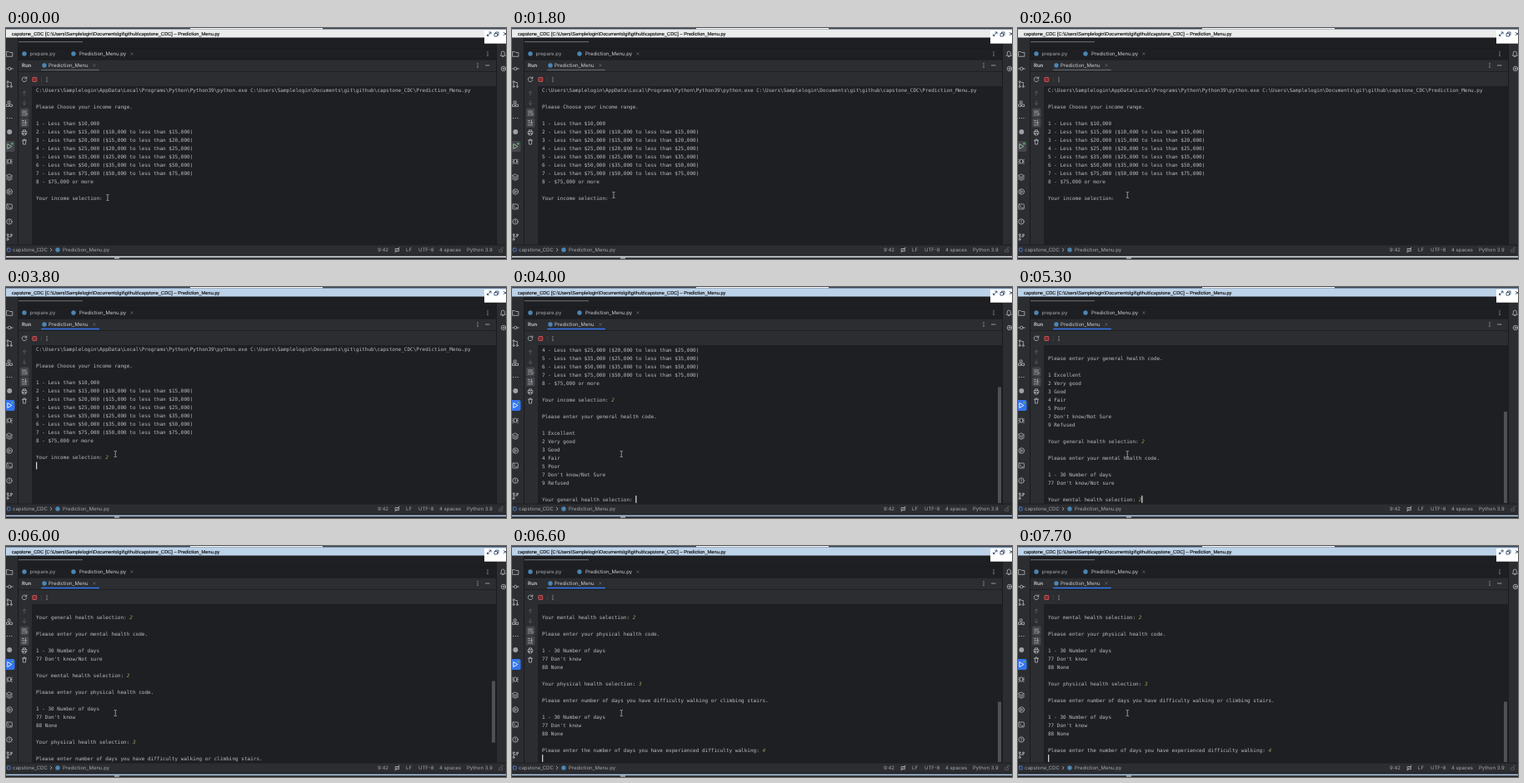
An HTML page for the animation above (8 s loop, 600 px wide and 278 px high).

```html
<!DOCTYPE html>
<html lang="en">
<head>
<meta charset="utf-8">
<title>Prediction menu</title>
<style>
  html, body { margin: 0; width: 100%; height: 100%; overflow: hidden; background: #1e1f22; }
  svg { display: block; width: 600px; height: 278px; text-rendering: geometricPrecision; }
  text { white-space: pre; }
  .ui { font: 6px Inter, sans-serif; fill: #ced0d6; }
  .dim { fill: #a4a7ae; }
  .strong { font-weight: 600; }
  .title { font: 5.68px "Liberation Sans", Arial, sans-serif; fill: #111; stroke: #111; stroke-width: .15; }
  .mono { font: 6.02px "DejaVu Sans Mono", monospace; fill: #bcbec4; }
  .answer { font-style: italic; fill: #98a35c; }
  .icon { fill: none; stroke: #b4b7bd; stroke-width: .8; stroke-linejoin: round; stroke-linecap: round; }
  .faint { stroke: #5d6066; }
  .dots { fill: #ced0d6; }
</style>
</head>
<body>
<svg viewBox="0 0 600 278">
  <defs>
    <clipPath id="view"><rect x="31" y="70" width="557" height="191"/></clipPath>
    <g id="kebab" class="dots"><circle cy="-2.2" r=".6"/><circle r=".6"/><circle cy="2.2" r=".6"/></g>
    <path id="cross" class="icon faint" d="M-1.3-1.3l2.6 2.6m0-2.6l-2.6 2.6"/>
    <circle id="badge" r="2.7" fill="#4b86b4"/>
  </defs>

  <!-- Panels -->
  <rect width="600" height="278" fill="#2b2d30"/>
  <rect x="15" y="11" width="573" height="27" fill="#1e1f22"/>
  <rect x="15" y="16" width="77" height="1.200" fill="#606368"/>
  <path d="M14.500 12v249M588.500 12v249M15 24.500h573M15 38h573" stroke="#1a1b1d"/>
  <rect x="31" y="70" width="557" height="191" fill="#1e1f22"/>
  <path d="M15 52.500h573M0 261h600" stroke="#1e1f22"/>
  <rect id="tabLine" x="42" y="49.800" width="70" height="1.500" rx=".7"/>
  <rect y="273.500" width="600" height="1" fill="#15171a"/>
  <rect id="bottomEdge" y="274.500" width="600" height="2"/>
  <rect y="276.500" width="600" height="1.500" fill="#25282c"/>
  <rect x="130" y="276.500" width="6" height="1" fill="#eceff2"/>

  <!-- Title bar -->
  <rect width="600" height="2" fill="#3c4656"/>
  <rect x="221" width="159" height="1.400" fill="#f2f4f6"/>
  <rect id="titleBar" y="1.500" width="600" height="10"/>
  <text class="title" x="7" y="9">capstone_CDC [C:\Users\Samplelogin\Documents\git\github\capstone_CDC] – Prediction_Menu.py</text>
  <rect x="574" y="3" width="26" height="15.700" fill="#fff"/>
  <path d="M577.500 9.500l4.500-4.500m-2.500 0h2.500v2.500M577.500 7.500v2h2M586 6.500h3.500v3.500h-3.500zM587.500 6.500v-1.500h3.500v3.500h-1.500M597 5l4 4m0-4l-4 4" fill="none" stroke="#35506f" stroke-width=".9"/>

  <!-- Tabs and run header -->
  <use href="#badge" x="22" y="31"/>
  <text class="ui dim" x="28.500" y="33.200">prepare.py</text>
  <use href="#badge" x="81" y="31"/>
  <text class="ui" x="88" y="33.200">Prediction_Menu.py</text>
  <use href="#cross" x="151" y="31"/>
  <use href="#kebab" x="578" y="31"/>
  <text class="ui strong" x="19" y="47">Run</text>
  <use href="#badge" x="46" y="45"/>
  <text class="ui" x="51" y="47">Prediction_Menu</text>
  <use href="#cross" x="106" y="45"/>
  <use href="#kebab" x="566" y="45"/>
  <path class="icon" d="M575.500 45h4.500"/>

  <!-- Run toolbar -->
  <path class="icon" d="M24.500 60.500a2.800 2.800 0 1 0 .3 2M24.800 58.800v2h-2"/>
  <rect x="31.800" y="59.500" width="5" height="5" rx=".6" fill="#7a2f33" stroke="#db5c5c" stroke-width=".8"/>
  <path d="M42.500 59v6" stroke="#43454a" stroke-width=".7"/>
  <use href="#kebab" x="49" y="62"/>
  <path class="icon faint" d="M22 81v-5m-2 2l2-2l2 2M22 87.500v5m-2-2l2 2l2-2"/>
  <rect x="17" y="96.500" width="10.500" height="11" rx="1.500" fill="#43454a"/>
  <rect x="17" y="108.500" width="10.500" height="11" rx="1.500" fill="#43454a"/>
  <path class="icon" d="M19.500 100h5M19.500 102.200h4.500a1.300 1.300 0 0 1 0 2.600h-1.500M19.500 104.800h1.500"/>
  <path class="icon" d="M19.500 111.500h2M19.500 114h2M19.500 116.800h5M23.500 111v4m-1.300-1.300l1.300 1.300l1.300-1.300"/>
  <path class="icon" d="M20.500 124.500v-1.700h3v1.700M20.500 127.500h-1.300v-3h5.600v3h-1.300M20.500 126.500h3v2.300h-3z"/>
  <path class="icon" d="M19.500 135.200h5M21 135v-1h2v1M20.200 135.300l.3 4.700h3l.3-4.700"/>

  <!-- Left strip -->
  <g class="icon">
    <path d="M1 28.500h2.300l1 1h3.500v4.800h-6.800z"/>
    <path d="M0 49h2.300M6 49h2.300"/><circle cx="4.200" cy="49" r="1.800"/>
    <path d="M2 66v3.500M6.300 69.500v-4h-2"/><circle cx="2" cy="64.700" r="1"/><circle cx="6.300" cy="70.500" r="1"/><circle cx="2" cy="70.500" r="1"/>
    <path d="M2.500 88h2.500v2.500h-2.500zM1 92h2.500v2.500h-2.500zM5 92h2.500v2.500h-2.500z"/>
    <ellipse cx="4" cy="160.500" rx="2" ry="2.700"/><path d="M.7 158.500l1.500.7M.4 161h1.600M.8 163.500l1.500-.8M7.300 158.500l-1.500.7M7.600 161h-1.600M7.200 163.500l-1.500-.8"/>
    <path d="M4 176l3.500 1.800l-3.500 1.800l-3.500-1.800zM.6 179.700l3.400 1.800l3.400-1.800M.6 181.600l3.400 1.800l3.400-1.800"/>
    <circle cx="4.200" cy="197" r="3.300"/><path d="M3.300 195.500l2.400 1.500l-2.400 1.500z"/>
    <rect x=".8" y="212" width="6.500" height="6" rx=".8"/><path d="M2.200 213.800l1.300 1.200l-1.300 1.200M4.500 216.500h1.500"/>
    <circle cx="4" cy="233" r="3.200"/><path d="M4 231.200v2.200M4 234.700v.1"/>
    <path d="M2 249.500v4M6.300 250v1.200h-4"/><circle cx="2" cy="248.700" r="1"/><circle cx="6.300" cy="249" r="1"/><circle cx="2" cy="254.500" r="1"/>
  </g>
  <g class="dots"><circle cx="1.500" cy="108.500" r=".6"/><circle cx="4.200" cy="108.500" r=".6"/><circle cx="6.900" cy="108.500" r=".6"/></g>
  <circle cx="4.200" cy="125" r="3" fill="#9da0a6"/>
  <rect id="runButton" x="-2" y="136" width="12.500" height="13" rx="2"/>
  <path id="runArrow" d="M1.800 139.500l5 3l-5 3z" fill="none" stroke-width=".9" stroke-linejoin="round"/>
  <circle cx="7.400" cy="139.300" r="1.200" fill="#5fad65"/>

  <!-- Right strip -->
  <path class="icon" d="M593.500 33l.8-1.200v-1.800a2 2 0 0 1 4 0v1.800l.8 1.200zM595.500 34.500h1.500"/>
  <circle class="icon" cx="597" cy="49" r="2.800"/><circle class="icon" cx="597" cy="49" r="1"/>

  <!-- Status bar -->
  <rect class="icon" x="1.500" y="265" width="3.600" height="4" rx=".6" style="stroke:#548af7"/>
  <text class="ui dim" x="8" y="269.200">capstone_CDC</text>
  <path class="icon" d="M53.300 265.200l1.800 1.800l-1.800 1.800"/>
  <use href="#badge" x="62" y="267"/>
  <text class="ui dim" x="68" y="269.200">Prediction_Menu.py</text>
  <text class="ui dim" x="446" y="269.200">9:42</text>
  <path class="icon" d="M467.500 265.500h4v3.200h-4zM467 270l5-6"/>
  <text class="ui dim" x="480" y="269.200">LF</text>
  <text class="ui dim" x="495" y="269.200">UTF-8</text>
  <text class="ui dim" x="520" y="269.200">4 spaces</text>
  <text class="ui dim" x="553" y="269.200">Python 3.9</text>
  <path class="icon faint" d="M592 266.800h3.500v2.600h-3.500zM594.500 266.500v-1.300a1.200 1.200 0 0 1 2.400 0"/>

  <!-- Console -->
  <g clip-path="url(#view)">
    <g id="console"></g>
    <rect id="caret" width="1.300" height="8.700" fill="#ced0d6"/>
    <rect id="thumb" x="583" width="4" fill="#4e5053"/>
  </g>
  <path id="pointer" d="M-1.600-3.500h1.200l.4.400l.4-.4h1.200M0-3v6M-1.600 3.500h1.200l.4-.4l.4.400h1.200" fill="none" stroke="#d0d2d6" stroke-width=".65"/>
</svg>

<script>
const LOOP = 8000, VISIBLE = 19, LINE_HEIGHT = 10, CHAR = 3.62, LEFT = 36;
const VIEW_TOP = 69, VIEW_HEIGHT = 191;
const $ = id => document.getElementById(id);

// A "|" separates a prompt from the answer typed after it.
const transcript = String.raw`C:\Users\Samplelogin\AppData\Local\Programs\Python\Python39\python.exe C:\Users\Samplelogin\Documents\git\github\capstone_CDC\Prediction_Menu.py

Please Choose your income range.

1 - Less than $10,000
2 - Less than $15,000 ($10,000 to less than $15,000)
3 - Less than $20,000 ($15,000 to less than $20,000)
4 - Less than $25,000 ($20,000 to less than $25,000)
5 - Less than $35,000 ($25,000 to less than $35,000)
6 - Less than $50,000 ($35,000 to less than $50,000)
7 - Less than $75,000 ($50,000 to less than $75,000)
8 - $75,000 or more

Your income selection: |2

Please enter your general health code.

1 Excellent
2 Very good
3 Good
4 Fair
5 Poor
7 Don't know/Not Sure
9 Refused

Your general health selection: |2

Please enter your mental health code.

1 - 30 Number of days
77 Don't know/Not sure

Your mental health selection: |2

Please enter your physical health code.

1 - 30 Number of days
77 Don't know
88 None

Your physical health selection: |3

Please enter number of days you have difficulty walking or climbing stairs.

1 - 30 Number of days
77 Don't know
88 None

Please enter the number of days you have experienced difficulty walking: |4
`.split('\n');

// time, printed lines, first visible line, answers typed, caret shown
const steps = [
  [0, 14, 0, 0, 0], [2700, 14, 0, 0, 1],
  [3600, 14, 0, 1, 1], [3700, 15, 0, 1, 1], [3900, 26, 3, 1, 1], [4000, 26, 7, 1, 1],
  [4500, 26, 7, 2, 1], [4800, 27, 8, 2, 1], [5000, 33, 14, 2, 1],
  [5300, 33, 14, 3, 1], [5500, 41, 22, 3, 1],
  [5900, 41, 22, 4, 1], [6000, 49, 24, 4, 1], [6100, 49, 30, 4, 1],
  [6400, 49, 30, 5, 1], [6600, 50, 31, 5, 1], [7200, 50, 31, 5, 0], [7700, 50, 31, 5, 1]
];

function addText(parent, tag, className, content) {
  const node = document.createElementNS('http://www.w3.org/2000/svg', tag);
  node.setAttribute('class', className);
  node.textContent = content;
  return parent.appendChild(node);
}

function set(id, attributes) {
  for (const name in attributes) $(id).setAttribute(name, attributes[name]);
}

function drawConsole([, count, top, typed, caretShown]) {
  const firstBaseline = top ? 77.7 : 77.2;
  const baseline = line => firstBaseline + (line - top) * LINE_HEIGHT;
  let answers = 0, caretColumn = 0;
  $('console').replaceChildren();
  transcript.slice(0, count).forEach((line, i) => {
    const [prompt, answer] = line.split('|');
    const shown = answer && answers++ < typed ? answer : '';
    caretColumn = prompt.length + shown.length;
    if (i < top || i >= top + VISIBLE) return;
    const text = addText($('console'), 'text', 'mono', prompt);
    text.setAttribute('x', LEFT);
    text.setAttribute('y', baseline(i));
    if (shown) addText(text, 'tspan', 'answer', shown);
  });
  set('caret', {
    x: LEFT + caretColumn * CHAR,
    y: baseline(count - 1) - 6.6,
    visibility: caretShown ? 'visible' : 'hidden'
  });
  set('thumb', {
    y: VIEW_TOP + VIEW_HEIGHT * top / count,
    height: VIEW_HEIGHT * VISIBLE / count,
    visibility: count > VISIBLE ? 'visible' : 'hidden'
  });
}

function drawFocus(focused) {
  set('titleBar', { fill: focused ? '#bcd2e8' : '#eaecec' });
  set('bottomEdge', { fill: focused ? '#a9c1da' : '#d5d9de' });
  set('tabLine', { fill: focused ? '#3574f0' : '#5a5d63' });
  set('runButton', { fill: focused ? '#3574f0' : '#43454a' });
  set('runArrow', { stroke: focused ? '#ffffff' : '#9fc7a3' });
}

let current;
function frame(now) {
  const time = Math.floor(now % LOOP / 100) * 100;
  const step = steps.findLast(s => s[0] <= time);
  if (step !== current) {
    current = step;
    drawConsole(step);
    drawFocus(time >= 2700);
  }
  const glide = Math.min(1, Math.max(0, (time - 1800) / 800));
  set('pointer', { transform: `translate(${122 + 9.3 * glide} ${time < 1800 ? 204 : 201})` });
  requestAnimationFrame(frame);
}
frame(performance.now());
</script>
</body>
</html>
```
